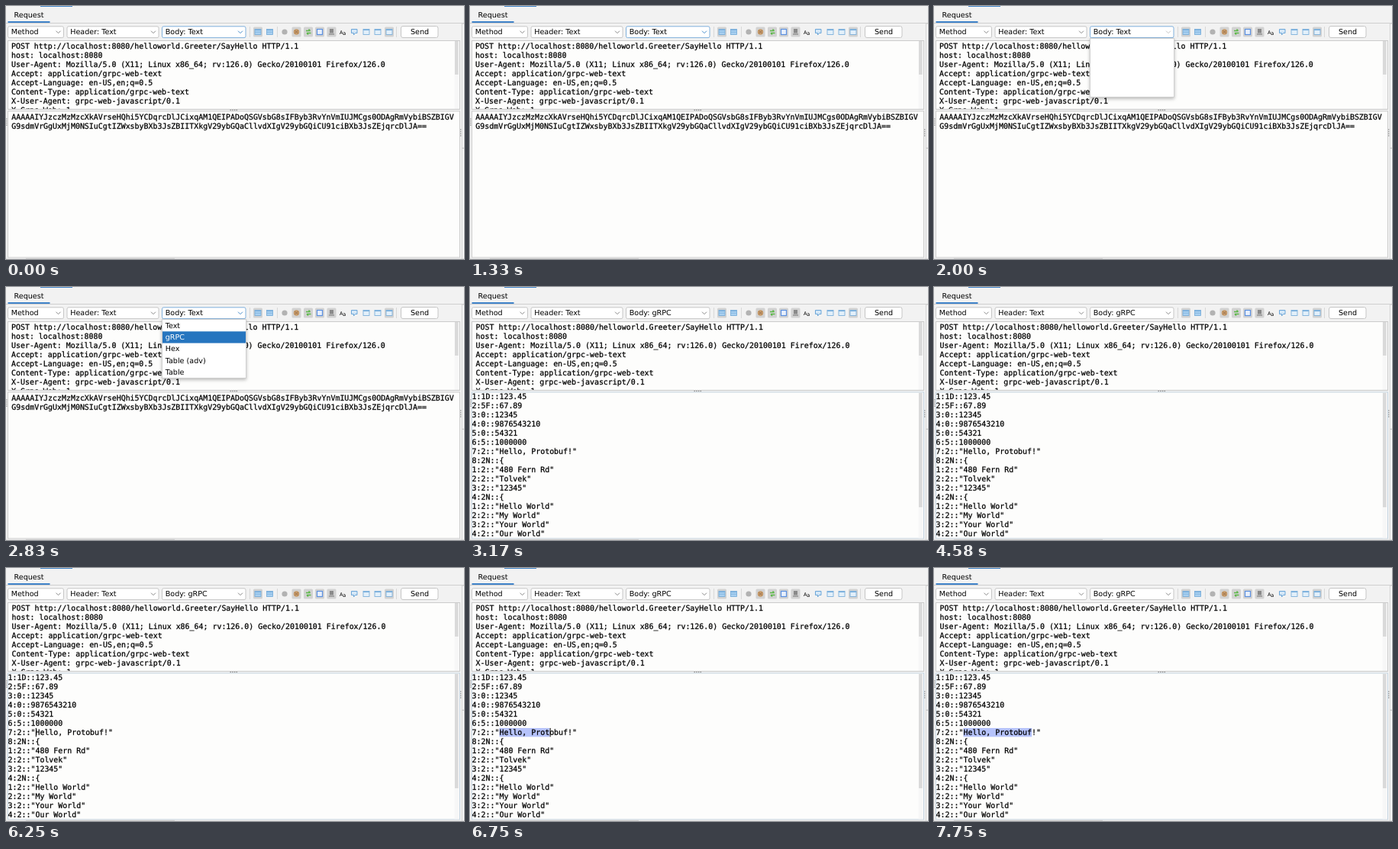
An HTML page that plays this animation: 600x332 px, repeating every 8000 ms.

```html
<!DOCTYPE html>
<html lang="en">
<head>
<meta charset="utf-8">
<style>
html, body { margin: 0; width: 600px; height: 332px; overflow: hidden; background: #f2f2f2; }
svg { display: block; }
text { font: 9.6px "DejaVu Sans", sans-serif; white-space: pre; text-rendering: geometricPrecision; }
.mono text { font: 9.93px "DejaVu Sans Mono", monospace; stroke: #000; stroke-width: .25px; }
#popup { filter: drop-shadow(0 2px 2px #0004); }
</style>
</head>
<body>
<svg width="600" height="332" viewBox="0 0 600 332">
  <defs>
    <clipPath id="headClip"><rect x="2" y="46" width="585" height="89"/></clipPath>
    <clipPath id="bodyClip"><rect x="1" y="138.5" width="586" height="191.5"/></clipPath>
  </defs>

  <rect x="45" width="42" height="1" fill="#4083c9"/>
  <text x="10.5" y="15">Request</text>
  <rect y="22" width="600" height="1" fill="#cfcfcf"/>
  <rect x="2.5" y="20" width="55" height="2" fill="#4083c9"/>

  <g id="bar"></g>

  <rect x="2.5" y="45.5" width="592" height="90" fill="#fdfdfc" stroke="#cbcbcb"/>
  <g class="mono" clip-path="url(#headClip)"><g id="head"></g></g>
  <rect x="587.5" y="46" width="6" height="89" fill="#f7f7f7"/>
  <rect x="588" y="46" width="4.5" height="44" fill="#dadada"/>

  <rect id="frame" x="2.5" y="138" width="592" height="192" fill="#fdfdfc"/>
  <g class="mono" clip-path="url(#bodyClip)">
    <g id="encoded"></g>
    <g id="decoded">
      <rect id="mark" y="210" height="11.5" fill="#b6c3fb"/>
      <g id="fields"></g>
      <rect id="caret" y="210" width="1" height="11.5"/>
    </g>
  </g>
  <g id="scroll">
    <rect x="587.5" y="139" width="6" height="190.5" fill="#f7f7f7"/>
    <rect id="thumb" x="588" width="4.5" height="150" fill="#dadada"/>
  </g>

  <rect x="597.5" y="23" width="3" height="309" fill="#fafafa" stroke="#d0d0d0"/>
  <path d="M597 186.5h3" stroke="#c4c4c4"/>
  <g id="dots"></g>
  <rect y="330.6" width="597" height="2" fill="#e6e6e6"/>
  <rect x="26" y="330.8" width="195" height="1.2" fill="#cdcdcd"/>

  <g id="popup">
    <rect x="204.5" y="42.5" width="110" height="77" fill="#fff" stroke="#d0d0d0"/>
    <rect id="pick" x="205" width="109" height="15.3" fill="#2675bf"/>
    <g id="items"></g>
  </g>
</svg>
<script>
const $ = id => document.getElementById(id);
const CHAR = 5.978, LINE = 12, LEFT = 2.6;
const esc = s => s.replace(/&/g, '&amp;').replace(/</g, '&lt;');
const text = (s, x, y, more = '') => `<text x="${x}" y="${y}" ${more}>${esc(s)}</text>`;
const rect = (x, y, w, h, fill, more = '') =>
  `<rect x="${x}" y="${y}" width="${w}" height="${h}" fill="${fill}" ${more}/>`;
const lines = (list, x, y) => list.map((s, i) => text(s, x, y + i * LINE)).join('');
const show = (id, on) => $(id).setAttribute('display', on ? 'inline' : 'none');
const set = (id, name, value) => $(id).setAttribute(name, value);

// Toolbar
const combo = (x, w, label, id) =>
  rect(x + .5, 26.8, w - 1, 14.8, '#fff', `rx="2" stroke="#c6c6c6" id="${id}Box"`) +
  text(label, x + 4.7, 37.1, `id="${id}Text"`) +
  `<path d="M${x + w - 10.5} 32.7l3 3 3-3" fill="none" stroke="#888" id="${id}Arrow"/>`;
const pressed = x => rect(x - 6, 27.5, 12, 13, '#d2d2d2', 'rx="1.5"');
const pane = (x, fill = '#e3f0fa') =>
  rect(x - 4, 30.5, 8, 7, fill, 'stroke="#6fa8d8" stroke-width=".8"') +
  rect(x - 4, 30.5, 8, 1.6, '#7fb2de');
const split = x => pane(x, '#a9d0f0') + rect(x - 4, 33.8, 8, .8, '#7fb2de');
const separator = x => rect(x, 27, 1, 14, '#d8d8d8');

$('bar').innerHTML =
  combo(2, 74, 'Method', 'method') +
  combo(79.5, 121, 'Header: Text', 'header') +
  combo(204, 110.5, 'Body: Text', 'body') +
  [319, 355, 511].map(separator).join('') +
  [330, 380.5, 396, 411, 426.5, 502].map(pressed).join('') +
  [330, 345.5].map(split).join('') +
  [472, 487, 502].map(x => pane(x)).join('') +
  '<circle cx="365" cy="34" r="3.6" fill="#b2b2b2"/>' +
  '<circle cx="380.5" cy="34" r="3.7" fill="#c79a68"/><path d="M378 32l5 4m0-4l-5 4" stroke="#9a7350" stroke-width=".8"/>' +
  '<path d="M393 32.5h5.5m-2-2l2 2M399.5 35.5h-5.5m2 2l-2-2" fill="none" stroke="#5cb848" stroke-width="1.6"/>' +
  rect(407.5, 30.5, 7, 7, '#e8f0fc', 'stroke="#5a8fe0" stroke-width="1.2"') +
  rect(424, 30, 5, 5.5, '#8a8a8a') + rect(423, 36, 7, 2, '#a2a2a2') +
  text('A', 437, 36.5, 'style="font-size:6.5px"') + text('a', 441.3, 37.5, 'style="font-size:6.5px"') +
  '<path d="M452.5 30.5h7.5v5h-2.5l-2 2.5v-2.5h-3z" fill="#d5e8f7" stroke="#6aa5d8"/>' +
  rect(517.5, 26.5, 48.5, 15, '#fff', 'rx="2.5" stroke="#c6c6c6"') +
  text('Send', 530, 37.3);

$('dots').innerHTML =
  [0, 1, 2, 3].map(i => rect(293.5 + i * 2.7, 136, 1.4, 1.2, '#888') +
    rect(.2, 147.5 + i * 2.7, 1.3, 1.4, '#999') +
    rect(595, 161.5 + i * 2.7, 1.3, 1.4, '#999')).join('');

// Text panes
$('head').innerHTML = lines([
  'POST http://localhost:8080/helloworld.Greeter/SayHello HTTP/1.1',
  'host: localhost:8080',
  'User-Agent: Mozilla/5.0 (X11; Linux x86_64; rv:126.0) Gecko/20100101 Firefox/126.0',
  'Accept: application/grpc-web-text',
  'Accept-Language: en-US,en;q=0.5',
  'Content-Type: application/grpc-web-text',
  'X-User-Agent: grpc-web-javascript/0.1',
  'X-Grpc-Web: 1'
], 7, 56.2);

$('encoded').innerHTML = lines([
  'AAAAAIYJzczMzMzcXkAVrseHQhi5YCDqrcDlJCixqAM1QEIPADoQSGVsbG8sIFByb3RvYnVmIUJMCgs0ODAgRmVybiBSZBIGV',
  'G9sdmVrGgUxMjM0NSIuCgtIZWxsbyBXb3JsZBIITXkgV29ybGQaCllvdXIgV29ybGQiCU91ciBXb3JsZEjqrcDlJA=='
], 7.3, 149);

$('fields').innerHTML = lines([
  '1:1D::123.45', '2:5F::67.89', '3:0::12345', '4:0::9876543210', '5:0::54321', '6:5::1000000',
  '7:2::"Hello, Protobuf!"', '8:2N::{', '1:2::"480 Fern Rd"', '2:2::"Tolvek"', '3:2::"12345"',
  '4:2N::{', '1:2::"Hello World"', '2:2::"My World"', '3:2::"Your World"', '4:2::"Our World"',
  '}', '}', '9:0::9876543210'
], LEFT, 147.4);

$('items').innerHTML = ['Text', 'gRPC', 'Hex', 'Table (adv)', 'Table']
  .map((s, i) => text(s, 208.7, 53.7 + i * 15.3)).join('');

// Value of the last [time, value] step reached
const at = (t, steps) => steps.reduce((v, [time, next]) => t >= time ? next : v, steps[0][1]);
const scrollSteps = [[0, 0], [3580, 36], [3670, 47.6], [4000, 12], [4080, 0]];
const pickSteps = [[0, -1], [2080, 0], [2420, 1]];
const selectSteps = [[0, 0], [6420, 2], [6500, 5], [6580, 7], [6670, 9], [6750, 11],
  [6830, 13], [7000, 14], [7250, 15]];
const selectX = LEFT + 6 * CHAR;

function draw(t) {
  const grpc = t >= 3170, pick = at(t, pickSteps);

  set('bodyBox', 'stroke', grpc ? '#c6c6c6' : '#7fb0dc');
  set('bodyArrow', 'stroke', grpc ? '#888' : t >= 1830 && t < 2080 ? '#c4c4c4' : '#4a8fcc');
  $('bodyText').textContent = grpc ? 'Body: gRPC' : 'Body: Text';
  set('head', 'transform', `translate(${grpc ? .6 : 0})`);

  show('popup', t >= 2000 && !grpc);
  show('items', pick >= 0);
  show('pick', pick >= 0);
  set('pick', 'y', 43 + Math.max(pick, 0) * 15.3);
  [...$('items').children].forEach((e, i) => e.setAttribute('fill', i === pick ? '#fff' : '#000'));

  show('encoded', !grpc);
  show('decoded', grpc);
  show('scroll', grpc);
  set('frame', 'stroke', grpc ? '#c3d3e0' : '#cbcbcb');
  const y = at(t, scrollSteps);
  set('decoded', 'transform', `translate(0 ${-y})`);
  set('thumb', 'y', 139 + y * 39 / 47.6);

  const width = at(t, selectSteps) * CHAR;
  set('mark', 'x', selectX);
  set('mark', 'width', width);
  set('caret', 'x', selectX + width + .4);
  show('caret', t >= 6250 && t < 7750);
}

const start = performance.now();
function tick() {
  draw((performance.now() - start) % 8000);
  requestAnimationFrame(tick);
}
tick();
</script>
</body>
</html>
```
